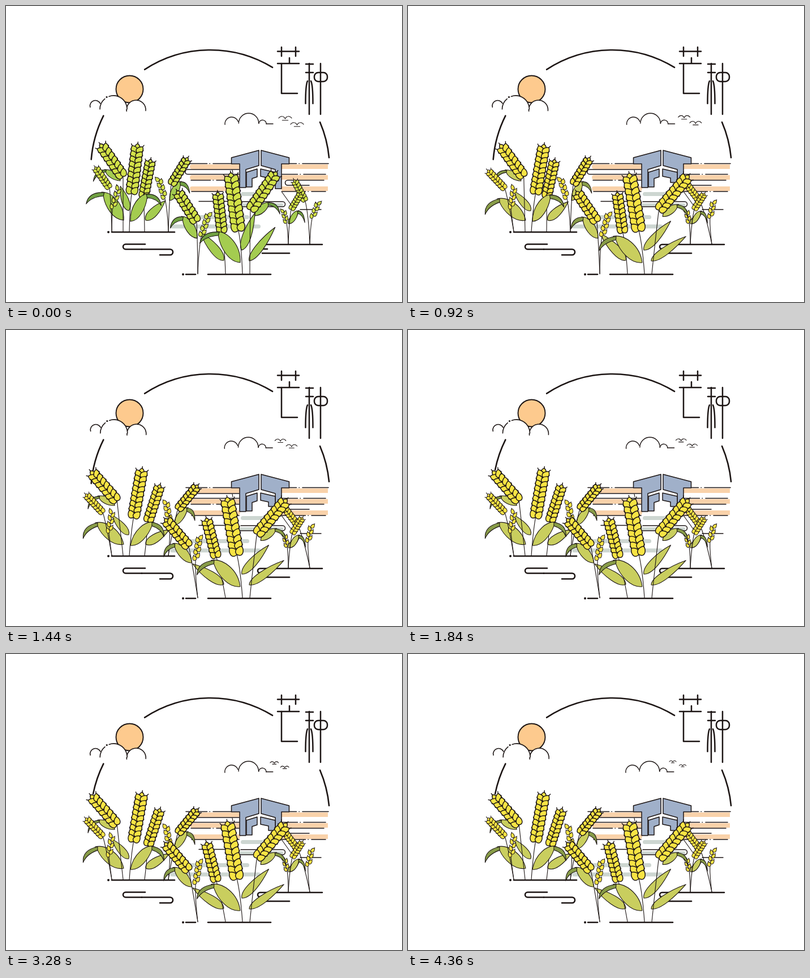
These frames come from a looping animation (700x525 px, 4.4 s). An HTML page with a canvas:

```html
<!DOCTYPE html>
<html lang="zh">
<head>
<meta charset="utf-8">
<title>芒种</title>
<style>
html, body { margin: 0; width: 100%; height: 100%; overflow: hidden; background: #fff; }
canvas { display: block; }
</style>
</head>
<body>
<canvas id="stage" width="700" height="525"></canvas>
<script>
const ctx = document.getElementById('stage').getContext('2d');
const LOOP = 4400, STEP = 40;
const INK = '#1c1514', PEACH = '#f9d2aa', GREY = '#cdd6d1', BLUE = '#a0b0c9', SUN = '#fdca8e';

// sway start times
const SOON = 520, LATER = 800, LAST = 920, SWAY = 400;

let now = 0;
let grain, leaf, shade;

const lerp = (a, b, p) => a + (b - a) * p;
const clamp = v => Math.max(0, Math.min(1, v));
const ease = v => { v = clamp(v); return v * v * (3 - 2 * v); };
const mix = (a, b, p) => `rgb(${a.map((v, i) => Math.round(lerp(v, b[i], p)))})`;

function pen(width) {
  ctx.lineWidth = width;
  ctx.strokeStyle = INK;
}

function paint(fill) {
  ctx.fillStyle = fill;
  ctx.fill();
  ctx.stroke();
}

function poly(points, fill) {
  ctx.beginPath();
  for (let i = 0; i < points.length; i += 2) ctx.lineTo(points[i], points[i + 1]);
  if (!fill) return ctx.stroke();
  ctx.closePath();
  paint(fill);
}

function hline(y, ...spans) {
  for (let i = 0; i < spans.length; i += 2) poly([spans[i], y, spans[i + 1], y]);
}

// level stroke interrupted by a single dot
function broken(y, x1, x2, cut) {
  hline(y, x1, cut - 4.5, cut, cut + .4, cut + 6, x2);
}

function arc(x, y, r, a, b, fill) {
  ctx.beginPath();
  ctx.arc(x, y, r, a, b);
  if (fill) paint(fill);
  else ctx.stroke();
}

function dot(x, y, r) {
  ctx.beginPath();
  ctx.arc(x, y, r, 0, 7);
  ctx.fillStyle = INK;
  ctx.fill();
}

// two level strokes joined by a half circle; side 1 bulges right, -1 left
function bend(x1, x2, xEnd, y1, y2, side) {
  const r = (y2 - y1) / 2;
  ctx.beginPath();
  ctx.moveTo(x1, y1);
  ctx.lineTo(x2, y1);
  ctx.arc(x2, y1 + r, r, -Math.PI / 2, Math.PI / 2, side < 0);
  ctx.lineTo(xEnd, y2);
  ctx.stroke();
}

function band(x1, x2, y, h, color) {
  ctx.fillStyle = color;
  ctx.beginPath();
  ctx.roundRect(x1, y, x2 - x1, h, h / 2);
  ctx.fill();
}

function drawRing() {
  pen(2.6);
  arc(361, 289, 211, 4.131, 5.261);
  arc(361, 289, 211, Math.PI + (now < 1720 ? .08 : .196), Math.PI + .464);
  arc(361, 289, 211, -.404, -.095);
}

function drawTitle() {
  pen(2.5);
  hline(80.5, 480, 518);
  for (const x of [487, 512]) poly([x, 73, x, 89]);
  poly([501, 92, 501, 101]);
  hline(102, 480, 518);
  poly([487, 102, 487, 155, 515, 155]);

  for (const y of [103, 118]) hline(y, 530, 543);
  for (const x of [536, 556]) poly([x, 102, x, 192]);
  for (const s of [-1, 1]) {
    ctx.beginPath();
    ctx.moveTo(536 + s * 3, 133);
    ctx.quadraticCurveTo(536 + s * 6.5, 140, 536 + s * 6.5, 173);
    ctx.stroke();
  }
  ctx.beginPath();
  ctx.roundRect(545, 118, 23, 16, 7);
  ctx.stroke();
}

function drawSky() {
  const drift = 1.1 * (1 - Math.cos(now / 800 * 2 * Math.PI));
  pen(1.9);
  arc(218.5, 147.5, 24, 0, 7, SUN);

  ctx.save();
  ctx.translate(drift, 0);
  pen(1.6);
  arc(230, 184, 17, Math.PI - .15, 2 * Math.PI + .1, '#fff');
  ctx.beginPath();
  ctx.arc(190, 183, 24, Math.PI, 2 * Math.PI);
  ctx.fill();
  arc(190, 183, 24, Math.PI, 4.02);
  arc(190, 183, 24, 4.37, 2 * Math.PI);
  dot(178, 161.5, 1.6);
  arc(158, 177, 9.5, Math.PI - .25, 5.85);
  ctx.restore();

  ctx.save();
  ctx.translate(-drift, 0);
  pen(1.4);
  arc(399, 209, 12, Math.PI - .1, 5.95);
  arc(429, 208, 17.7, Math.PI, 2 * Math.PI);
  arc(453.5, 209, 6.7, Math.PI + .1, 2 * Math.PI);
  hline(209, 460, 472);
  ctx.restore();
}

function drawBird(x, y, size) {
  const w = size / 2;
  pen(1.1);
  ctx.beginPath();
  ctx.moveTo(x - w, y);
  ctx.bezierCurveTo(x - w * .75, y - w * .4, x - w * .2, y - w * .4, x, y + w * .1);
  ctx.bezierCurveTo(x + w * .2, y - w * .4, x + w * .75, y - w * .4, x + w, y);
  ctx.stroke();
  hline(y + w * .33, x - w * .45, x + w * .45);
}

function drawBirds() {
  const p = now / 4360, size = lerp(23, 12, p);
  drawBird(lerp(493.5, 468, p), lerp(199, 191, p), size);
  drawBird(lerp(514.5, 485.5, p), lerp(210, 198, p), size);
}

function drawFields() {
  for (const y of [281, 300, 320]) {
    band(325, 414, y, 8, PEACH);
    ctx.fillRect(487, y, 82, 8);
  }
  pen(1.6);
  broken(279.5, 318, 398, 360);
  bend(412, 321, 412, 290, 298.5, -1);
  broken(309, 327, 412, 366);
  broken(329, 328, 412, 388);
  broken(279.5, 501, 570, 518);
  broken(298.5, 488, 565, 520);
  bend(562, 498, 536, 309, 318, -1);
  broken(329, 488, 565, 534);
}

function drawBarn() {
  pen(1.5);
  poly([398.5, 269, 447, 256, 447, 283, 424, 290, 424, 322, 413, 322, 413, 280, 398.5, 280], BLUE);
  poly([451, 256, 500.5, 269, 500.5, 280, 487, 280, 487, 324, 476, 324, 476, 290, 451, 283], BLUE);
  poly([425, 295, 444, 289, 444, 303, 435, 306, 435, 321, 425, 321], BLUE);
  poly([450, 289, 476, 295, 476, 313, 464, 313, 464, 305, 450, 302], BLUE);
  pen(1.2);
  poly([400, 291, 401, 296]);
}

function drawRoad() {
  band(415, 466, 330, 7, GREY);
  band(412, 490, 350, 5, GREY);
  band(325, 430, 371, 7, GREY);
  band(290, 450, 387.5, 7, GREY);
  pen(1.5);
  hline(346.5, 341, 405);
  bend(415, 489, 410, 347, 356, 1);
  hline(361, 520, 557);
  pen(1.1);
  poly([487, 329, 507, 357]);
}

function drawGround() {
  pen(2.6);
  hline(401, 187, 298);
  dot(181, 401, 2);
  hline(476, 318, 335, 357, 468);
  dot(313, 476, 2);
  bend(246, 211.5, 240, 422.5, 431.5, -1);
  bend(240, 290, 272, 431.5, 441.5, 1);
  bend(559, 449, 462, 423, 431, -1);
  hline(438.5, 453, 501);
}

// runs draw calls in a frame moved to (x, y) and turned
function at(x, y, turn, parts) {
  ctx.save();
  ctx.translate(x, y);
  ctx.rotate(turn);
  parts();
  ctx.restore();
}

// everything growing from one pivot leans together in the wind
function grow(x, y, turn, begin, parts) {
  at(x, y, turn * ease((now - begin) / SWAY), parts);
}

function kernel(x, y, turn, len, wid, awn) {
  at(x, y, turn, () => {
    ctx.beginPath();
    ctx.moveTo(0, 0);
    ctx.bezierCurveTo(-wid * .85, -len * .05, -wid * .55, -len * .75, 0, -len);
    ctx.bezierCurveTo(wid * .55, -len * .75, wid * .85, -len * .05, 0, 0);
    paint(grain);
    poly([0, -len, 0, -len - awn]);
  });
}

function looseEar(len, w) {
  const n = Math.round(len / 6.2), gap = len / (n + .8);
  for (let i = n - 1; i >= 0; i--) {
    const s = i % 2 ? 1 : -1;
    kernel(s * w * .06, -gap * i, s * .45, gap * 1.65, w * .5, 1);
  }
}

function fullEar(len, w) {
  const n = Math.round(len / (w * .4)), gap = len / (n + .9);
  kernel(0, -gap * (n - .4), 0, gap * 1.25, w * .34, 3);
  for (let i = n - 1; i >= 0; i--) {
    for (const s of [-1, 1]) kernel(s * w * .05, -gap * i, s * .58, gap * 1.6, w * .42, w * .14);
  }
}

// stem from the pivot to (x, y), topped by an ear
function ear(x, y, len, lean, w) {
  pen(1.1);
  ctx.beginPath();
  ctx.moveTo(x, y);
  ctx.quadraticCurveTo(x * .25, y * .65, 0, 0);
  ctx.stroke();
  pen(w < 18 ? 1 : 1.45);
  at(x, y, lean, () => (w < 14 ? looseEar : fullEar)(len, w));
}

function blade(len, lean, w) {
  pen(1.1);
  at(0, 0, lean, () => {
    ctx.beginPath();
    ctx.moveTo(0, 0);
    ctx.bezierCurveTo(-w * .8, -len * .1, -w * .65, -len * .6, 0, -len);
    ctx.bezierCurveTo(w * .5, -len * .65, w * .9, -len * .15, 0, 0);
    paint(leaf);
  });
}

// arched leaf: rises by (dx, dy) to its crest, then droops to a tip
function fold(x, y, dx, dy) {
  const tx = dx * 1.7, ty = 21 - dy;
  const mx = dx * .92, my = Math.min(7, dy * .22) - dy;
  pen(1.1);
  at(x, y, 0, () => {
    ctx.beginPath();
    ctx.moveTo(0, 0);
    ctx.bezierCurveTo(-dx * .04, -dy * .55, dx * .5, -dy, dx, -dy);
    ctx.lineTo(mx, my);
    ctx.bezierCurveTo(dx * .85, -dy * .5, dx * .5, -dy * .02, 0, 0);
    paint(leaf);
    ctx.beginPath();
    ctx.moveTo(dx * .88, 1 - dy);
    ctx.quadraticCurveTo(lerp(dx, tx, .85), -dy - 1, tx, ty);
    ctx.quadraticCurveTo(lerp(dx, tx, .65), lerp(my, ty, .1), mx, my);
    ctx.closePath();
    paint(shade);
  });
}

function ripen(span) {
  const p = clamp(now / span);
  grain = mix([211, 226, 72], [248, 228, 68], p);
  leaf = mix([164, 204, 80], [201, 206, 94], p);
  shade = mix([112, 160, 66], [136, 156, 72], p);
}

function drawRightPlant() {
  ripen(1000);
  grow(499, 386, .1, SOON, () => blade(30, .69, 8));
  grow(537, 422, -.16, SOON, () => {
    ear(-8, -76, 43, -.485, 15);
    ear(4, -45, 36, .365, 11);
  });
  grow(499, 422, .03, SOON, () => {
    fold(2, -36, 16, 23);
    ear(-3, -37, 28, -.25, 10);
    ear(5, -61, 35, .54, 15);
  });
}

function drawLeftPlant() {
  ripen(560);
  grow(217, 363, -.38, SOON, () => blade(46, -.33, 12));
  grow(247, 380, .23, LATER, () => blade(49, .785, 14));
  grow(208, 380, -.27, SOON, () => fold(0, 0, -39, 50));
  grow(207, 400, -.11, LATER, () => {
    fold(-5, -90, -28, 20);
    ear(0, -97, 72, -.61, 24);
  });
  grow(187, 400, -.15, SOON, () => {
    ear(-4, -77, 46, -.6, 16);
    ear(1, -40, 45, .29, 11);
  });
  grow(218, 400, .05, SOON, () => ear(4, -67, 90, .123, 26));
  grow(245, 400, .13, LATER, () => ear(-2, -60, 70, .186, 22));
  grow(220, 382, .22, LATER, () => fold(0, 0, 32, 49));
  grow(287, 400, .14, LAST, () => {
    fold(2, -55, 21, 34);
    ear(-6, -58, 43, -.306, 13);
    ear(5, -83, 57, .55, 19);
  });
}

function drawFrontPlant() {
  ripen(560);
  grow(385, 451, -.3, LATER, () => blade(66, -.69, 15));
  grow(417, 433, .41, SOON, () => blade(70, .335, 14));
  grow(430, 452, .3, SOON, () => blade(75, .655, 13));
  grow(339, 475, -.15, LATER, () => {
    fold(-1, -63, -28, 39);
    ear(-2, -92, 66, -.56, 24);
    ear(6, -66, 48, .315, 13);
  });
  grow(388, 475, -.14, LATER, () => ear(-6, -73, 73, -.11, 23));
  grow(418, 475, -.035, SOON, () => ear(-7, -76, 105, -.134, 30));
  grow(431, 475, .1, SOON, () => {
    fold(9, -103, 26, 24);
    ear(1, -113, 83, .605, 25);
  });
  grow(414, 455, -.18, SOON, () => fold(0, 0, -42, 55));
}

function draw() {
  ctx.fillStyle = '#fff';
  ctx.fillRect(0, 0, 700, 525);
  ctx.lineCap = ctx.lineJoin = 'round';
  drawRing();
  drawTitle();
  drawSky();
  drawBirds();
  drawFields();
  drawBarn();
  drawRoad();
  drawGround();
  drawRightPlant();
  drawLeftPlant();
  drawFrontPlant();
}

const start = performance.now();
function tick() {
  now = Math.floor((performance.now() - start) % LOOP / STEP) * STEP;
  draw();
  requestAnimationFrame(tick);
}
tick();
</script>
</body>
</html>
```
